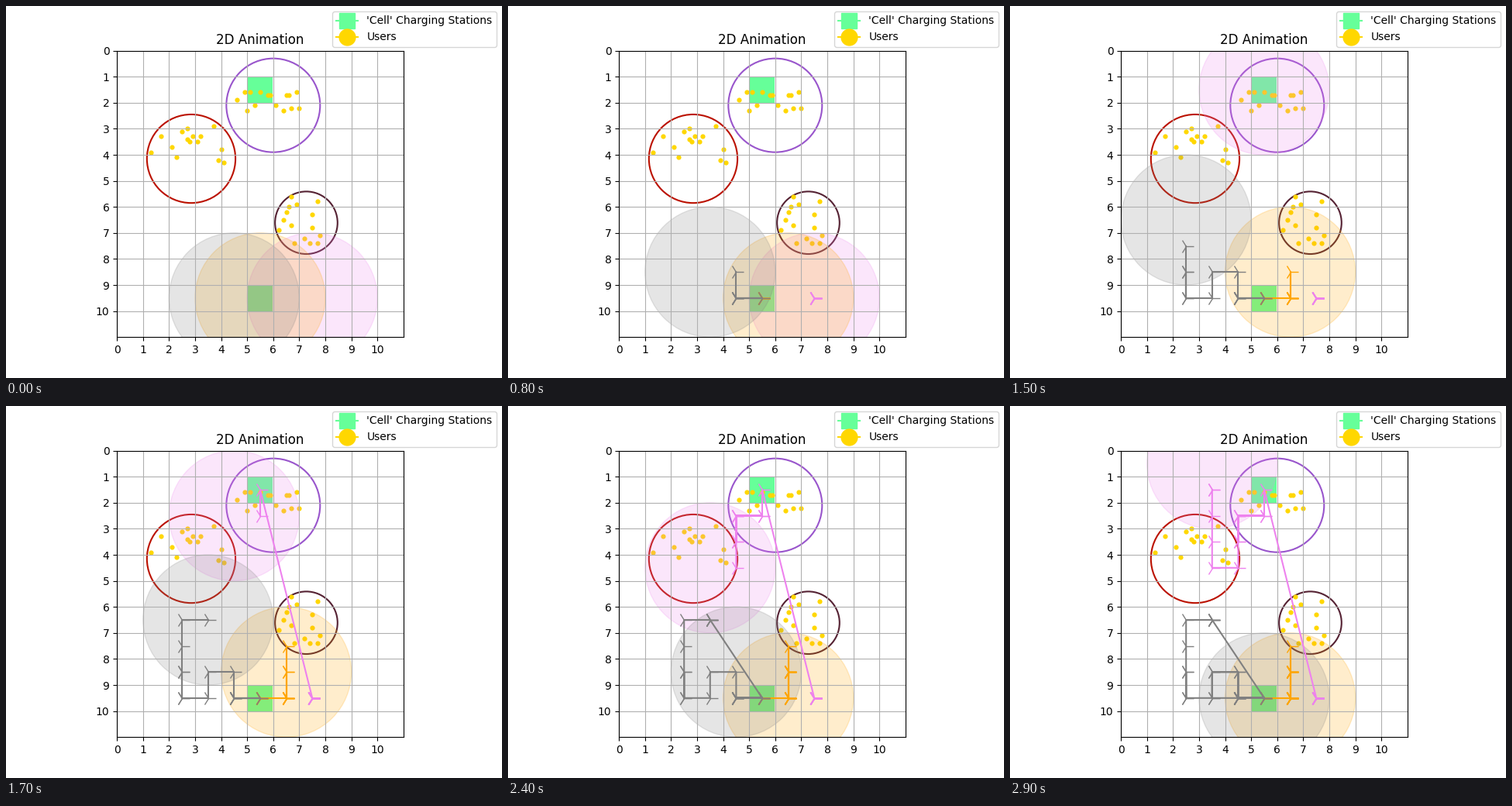
Recreate the animation shown at these times as a matplotlib script. Size 640 by 480 pixels, loop 3000 ms.

```python
import math
import random

import matplotlib.pyplot as plt
from matplotlib.animation import FuncAnimation
from matplotlib.lines import Line2D
from matplotlib.patches import Circle, Rectangle

FRAMES, INTERVAL = 30, 100
STATION, GOLD = "#66ff99", "gold"
REACH = 2.5
USERS = 15
STEPS = {"L": (-1, 0), "R": (1, 0), "U": (0, -1), "D": (0, 1), "S": (0, 0)}

# colour, start, charging station, moves (S stays, H jumps to the station)
DRONES = [
    ("violet", (7.5, 9.5), (5.5, 1.5), "S" * 14 + "HDLRLDUDDLUUUSU"),
    ("orange", (5.5, 9.5), (5.5, 9.5),
     "S" * 7 + "RSSUDSSUUD" + "S" * 4 + "D" + "S" * 7),
    ("gray", (4.5, 9.5), (5.5, 9.5), "RLRLSSULDLUDUUURSSSHLRLULDRSR"),
]

# colour, centre, radius, x range and y range of the users
GROUPS = [
    ("#9955cc", (6, 2.1), 1.8, (4.4, 7.2), (1.5, 2.4)),
    ("#bb1100", (2.85, 4.15), 1.7, (1.2, 4.3), (2.8, 4.5)),
    ("#552233", (7.27, 6.61), 1.2, (6.1, 7.9), (5.6, 7.5)),
]


def walk(start, station, moves):
    path = [start]
    for move in moves:
        if move == "H":
            path.append(station)
        else:
            dx, dy = STEPS[move]
            path.append((path[-1][0] + dx, path[-1][1] + dy))
    return path


def scatter_users(rng, center, radius, x_range, y_range):
    """Random spots on a 0.1 lattice that lie inside the group's circle."""
    users = []
    while len(users) < USERS:
        spot = round(rng.uniform(*x_range), 1), round(rng.uniform(*y_range), 1)
        if math.dist(spot, center) <= radius and spot not in users:
            users.append(spot)
    return users


fig, ax = plt.subplots(figsize=(6.4, 4.8), dpi=100)
ax.set_aspect("equal")
ax.set(xlim=(0, 11), ylim=(11, 0), xticks=range(11), yticks=range(11))
ax.set_title("2D Animation")
ax.grid(True)

for corner in [(5, 1), (5, 9)]:
    ax.add_patch(Rectangle(corner, 0.97, 1, color=STATION, lw=0))

rng = random.Random(4)
for color, center, radius, x_range, y_range in GROUPS:
    ax.add_patch(Circle(center, radius, fill=False, ec=color, lw=1.5))
    users = scatter_users(rng, center, radius, x_range, y_range)
    ax.scatter(*zip(*users), s=20, color=GOLD, lw=0, zorder=1)

paths = [walk(*drone[1:]) for drone in DRONES]
discs = [ax.add_patch(Circle(start, REACH, color=color, alpha=0.2))
         for color, start, *_ in DRONES]
trails = [ax.plot([], [], marker="4", ms=15, color=color)[0]
          for color, *_ in DRONES]

fig.legend(handles=[
    Line2D([0], [0], marker=shape, ms=15, color=color, label=label)
    for shape, color, label in [("s", STATION, "'Cell' Charging Stations"),
                                ("o", GOLD, "Users")]])


def update(frame):
    # The trail lags one step behind the disc.
    for disc, trail, path in zip(discs, trails, paths):
        disc.center = path[frame]
        trail.set_data([x for x, _ in path[:frame]],
                       [y for _, y in path[:frame]])
    return discs + trails


anim = FuncAnimation(fig, update, frames=FRAMES, interval=INTERVAL,
                     init_func=lambda: update(0), repeat=True,
                     repeat_delay=0, blit=False)
plt.show()
```
